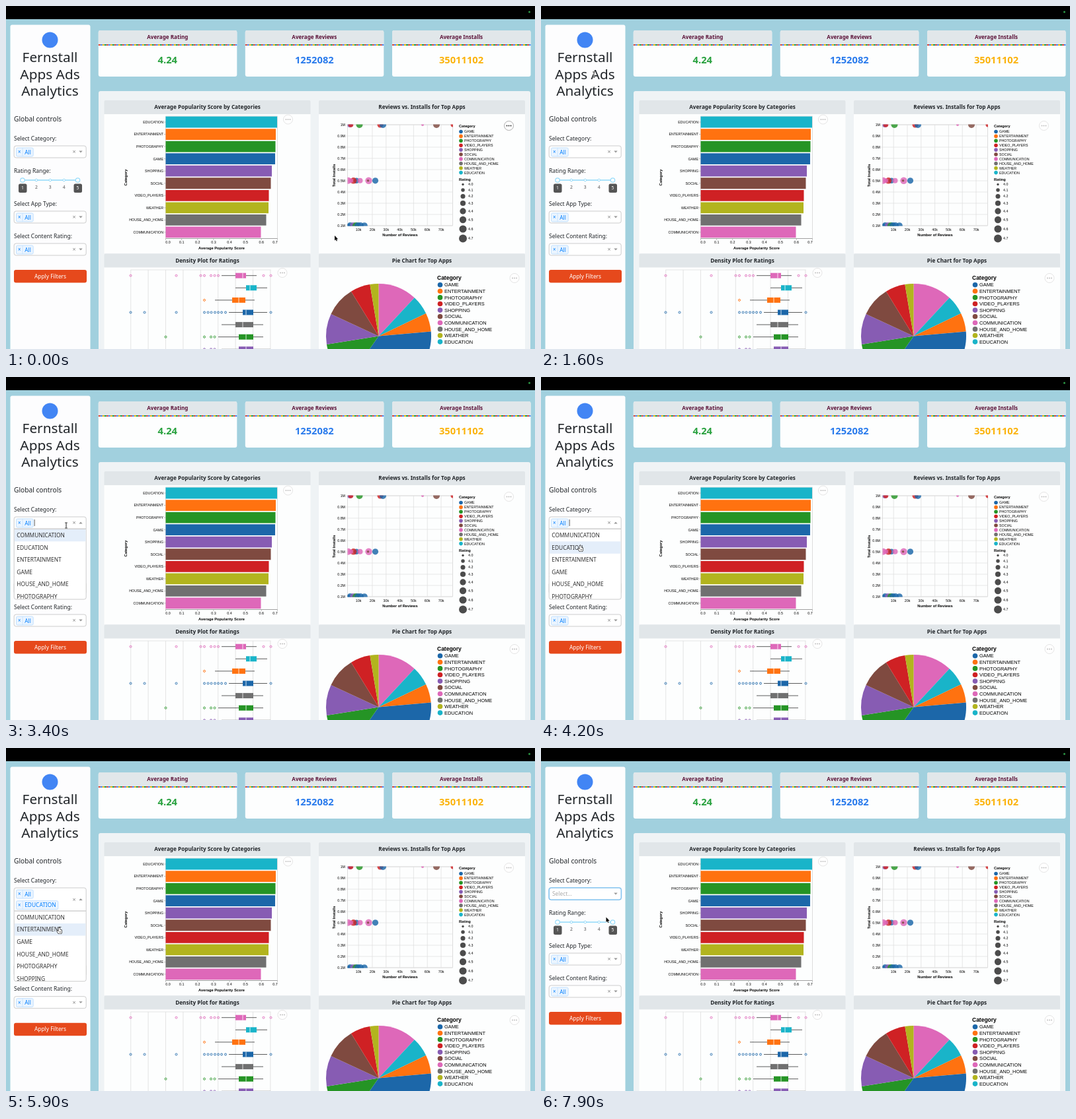
Write an HTML page with a canvas that moves like this. It is 800 by 520 pixels and loops after 8 s.

```html
<!DOCTYPE html>
<html lang="en">
<head>
<meta charset="utf-8">
<title>Ads Analytics</title>
<style>
html, body { margin: 0; width: 800px; height: 520px; overflow: hidden; background: #a1d0de; }
canvas { display: block; }
</style>
</head>
<body>
<canvas id="stage" width="800" height="520"></canvas>
<script>
const c = document.getElementById('stage').getContext('2d');
const LOOP = 8000, TAU = Math.PI * 2;
const UI = '"Noto Sans", "Open Sans", sans-serif';
const CHART = '"Liberation Sans", Arial, sans-serif';
const MENU = 'Inter, sans-serif';
const COLORS = {
  GAME: '#1c67a9', ENTERTAINMENT: '#ff7210', PHOTOGRAPHY: '#259425', VIDEO_PLAYERS: '#cf2124',
  SHOPPING: '#875cb3', SOCIAL: '#7f4a40', COMMUNICATION: '#de68b9', HOUSE_AND_HOME: '#707070',
  WEATHER: '#b2b41e', EDUCATION: '#19b4c9'
};
const NAMES = Object.keys(COLORS);
const [BLUE, ORANGE, GREEN, RED, PURPLE, BROWN, PINK, GREY, OLIVE, CYAN] = Object.values(COLORS);

// ---- drawing helpers ----
function rect(x, y, w, h, fill, r = 0, stroke) {
  c.beginPath();
  c.roundRect(x, y, w, h, r);
  if (fill) { c.fillStyle = fill; c.fill(); }
  if (stroke) { c.strokeStyle = stroke; c.lineWidth = 1; c.stroke(); }
}
function dot(x, y, r, fill, stroke, width = 1) {
  c.beginPath();
  c.arc(x, y, r, 0, TAU);
  if (fill) { c.fillStyle = fill; c.fill(); }
  if (stroke) { c.strokeStyle = stroke; c.lineWidth = width; c.stroke(); }
}
function line(x1, y1, x2, y2, color, width = 1) {
  c.strokeStyle = color;
  c.lineWidth = width;
  c.beginPath();
  c.moveTo(x1, y1);
  c.lineTo(x2, y2);
  c.stroke();
}
function poly(points, fill, stroke) {
  c.beginPath();
  points.forEach(p => c.lineTo(...p));
  c.closePath();
  if (stroke) { c.strokeStyle = stroke; c.lineWidth = 1.2; c.stroke(); }
  c.fillStyle = fill;
  c.fill();
}
// y is the middle of the capitals
function text(s, x, y, size, color = '#212529', align = 'left', font = UI, weight = 400) {
  c.font = `${weight} ${size}px ${font}`;
  c.textAlign = align;
  c.fillStyle = color;
  c.fillText(s, x, y + size * .36);
}
const label = (s, x, y, size = 5.3, align = 'left', weight = 400) =>
  text(s, x, y, size, '#000', align, CHART, weight);
function sideLabel(s, x, y) {
  c.save();
  c.translate(x, y);
  c.rotate(-Math.PI / 2);
  label(s, 0, 0, 5.75, 'center', 700);
  c.restore();
}
function actions(x, y, hot) {
  dot(x, y, 7, '#fff', hot ? '#999' : '#ddd', .8);
  for (const d of [-3, 0, 3]) dot(x + d, y, .9, hot ? '#222' : '#bbb');
}

// ---- dashboard ----
function card(x, title, value, color) {
  rect(x, 37, 209.5, 70, '#fdfefe', 3);
  rect(x, 37, 209.5, 21.5, '#e1e7ea', [3, 3, 0, 0]);
  const stripe = ['#db4437', '#4285f4', '#f4b400', '#0f9d58'];
  for (let i = 0; i < 70; i++) rect(x + i * 3, 58, Math.min(3, 209.5 - i * 3), 2, stripe[i % 4]);
  text(title, x + 104.5, 47.5, 8.1, '#5c1238', 'center', UI, 700);
  text(value, x + 104.5, 82, 14.7, color, 'center', UI, 700);
}
function panel(x, y, title) {
  rect(x, y, 312, 21, '#e1e6e9', [2, 2, 0, 0]);
  rect(x, y + 21, 312, 211, '#fdfefe');
  text(title, x + 156, y + 10.5, 8.2, '#212529', 'center', UI, 700);
}

function barChart() {
  const ends = [410, 408, 407.5, 407, 402, 400.5, 397.5, 397, 393.5, 385.5];
  const order = ['EDUCATION', 'ENTERTAINMENT', 'PHOTOGRAPHY', 'GAME', 'SHOPPING', 'SOCIAL',
    'VIDEO_PLAYERS', 'WEATHER', 'HOUSE_AND_HOME', 'COMMUNICATION'];
  rect(241.5, 167, 169, 185.5, null, 0, '#ddd');
  order.forEach((name, i) => {
    const y = 176 + i * 18.55;
    rect(241.5, y - 8.4, ends[i] - 241.5, 16.8, COLORS[name]);
    line(238.8, y, 241.5, y, '#999', .6);
    label(name, 238, y, 5.3, 'right');
  });
  for (let i = 0; i < 8; i++) {
    const x = 241.5 + i * 24.13;
    line(x, 352.5, x, 355, '#999', .6);
    label((i / 10).toFixed(1), i == 0 ? 245 : i == 7 ? 407 : x, 358.5, 5.4, 'center');
  }
  line(241.5, 352.5, 410.5, 352.5, '#888', .7);
  label('Average Popularity Score', 326, 366.5, 5.75, 'center', 700);
  sideLabel('Category', 181, 260);
}

function scatter() {
  rect(516.5, 180, 159, 153, null, 0, '#ddd');
  for (let i = 1; i < 8; i++) {
    const x = 512.4 + i * 20.8;
    line(x, 180, x, 333, '#ddd', .7);
    label(i + '0k', x, 339, 5.4, 'center');
  }
  for (let i = 1; i <= 10; i++) {
    const y = 350 - i * 17;
    line(514, y, 675.5, y, '#ddd', .7);
    label(i == 10 ? '1M' : '0.' + i + 'M', 513, y, 5.3, 'right');
  }
  c.save();
  c.beginPath();
  c.rect(516.5, 179.5, 159.5, 154);
  c.clip();
  c.globalAlpha = .82;
  const rows = [
    [180, [[520, 4, PURPLE], [521.5, 3.8, RED], [534.5, 5, GREEN], [566, 4.5, RED], [570, 5, BLUE],
      [630, 2, PINK], [651, 5, BROWN], [676, 3.5, RED]]],
    [264.8, [[530, 4.3, BLUE], [525.5, 4.8, RED], [521.5, 3.5, PINK], [517.5, 5, PINK],
      [535.5, 4, PINK], [548.5, 5.2, PINK], [547.5, 1.8, BROWN], [558.5, 4.6, BLUE]]],
    [333, [[518.5, 3, BLUE], [520.5, 5, BLUE], [525, 5, PURPLE], [529, 5, GREEN], [532, 5, BLUE],
      [536, 5, BLUE], [542, 4.8, BLUE]]]
  ];
  for (const [y, dots] of rows) for (const [x, r, color] of dots) dot(x, y, r, color);
  c.restore();
  label('Number of Reviews', 596, 347, 5.75, 'center', 700);
  sideLabel('Total Installs', 496, 257);

  label('Category', 685, 182, 5.7, 'left', 700);
  NAMES.forEach((name, i) => {
    const y = 190.5 + i * 6.9;
    dot(688, y, 2.8, COLORS[name]);
    label(name, 693, y);
  });
  label('Rating', 685, 262.5, 5.7, 'left', 700);
  [270.5, 279, 288.5, 299, 311, 324, 338, 352.5].forEach((y, i) => {
    dot(691, y, 1.9 * Math.sqrt(i * 1.3 + .8), '#4c4c4c');
    label('4.' + i, 699, y);
  });
}

// color, whisker ends, box ends, median, outliers
const BOXES = [
  [PINK, 326, 379, 347, 363, 358, [188.5, 257.5, 294.5, 300, 310, 315.5, 321, 389.5, 400.5]],
  [CYAN, 347, 395, 363, 379, 369, []],
  [ORANGE, 316, 376, 342, 362, 352, [300]],
  [BLUE, 337, 395, 358, 374, 363, [188.5, 209.5, 257.5, 300, 305.5, 310.5, 316, 321, 326, 332, 400.5]],
  [GREY, 326, 389, 347, 374, 358, []],
  [GREEN, 321, 389, 352, 374, 363, [241.5, 300, 310, 315.5]],
  [PURPLE, 326, 400, 352, 374, 363, [300, 310, 315.5]]
];
function boxPlot() {
  for (let i = 0; i < 9; i++) line(188.7 + i * 26.4, 400, 188.7 + i * 26.4, 520, '#ddd', .8);
  line(188.5, 400, 400.5, 400, '#ddd', .8);
  BOXES.forEach(([color, lo, hi, q1, q3, mid, outliers], i) => {
    const y = 408.7 + i * 18.6;
    line(lo, y, hi, y, '#333', .8);
    rect(q1, y - 4, q3 - q1, 8, color);
    line(mid, y - 4, mid, y + 4, '#fff', .8);
    outliers.forEach(x => dot(x, y, 1.5, null, color, .9));
  });
}

function pie() {
  const stops = [0, 43, 64.3, 85, 215, 261, 295, 328.5, 350.5, 360];
  [PINK, CYAN, ORANGE, BLUE, GREEN, PURPLE, BROWN, RED, OLIVE].forEach((color, i) => {
    const at = d => (d - 90) * TAU / 360;
    c.beginPath();
    c.moveTo(563.5, 500.5);
    c.arc(563.5, 500.5, 79.5, at(stops[i]), at(stops[i + 1]));
    c.fillStyle = color;
    c.fill();
  });
  label('Category', 652, 412, 8.5, 'left', 700);
  NAMES.forEach((name, i) => {
    const y = 422.7 + i * 9.6;
    dot(656.5, y, 3.8, COLORS[name]);
    label(name, 663, y, 7.4);
  });
}

// ---- sidebar ----
function tag(name, y) {
  c.font = `8.4px ${UI}`;
  const w = c.measureText(name).width + 16;
  rect(15.5, y - 6.5, w, 13, '#ebf5ff', 2, '#c2e0ff');
  line(25, y - 6.5, 25, y + 6.5, '#c2e0ff', .8);
  text('×', 20.2, y, 8, '#007eff', 'center');
  text(name, 28.2, y, 8.4, '#007eff');
  return 15.5 + w;
}
function select(y, tags, { open, focus, caret } = {}) {
  const h = tags.length > 1 ? 35 : 18, mid = y + h / 2;
  if (focus) rect(11.5, y - .5, 110.5, h + 1, null, 3, '#cbe6f8');
  rect(12.2, y, 109, h, '#fff', open ? [3, 3, 0, 0] : 3, focus ? '#5aaeea' : '#ccc');
  let end = 15;
  tags.forEach((name, i) => end = tag(name, y + 9.5 + i * 16.7));
  if (!tags.length) text('Select...', 17, mid, 8.4, '#aaa');
  if (caret) line(end + 2, y + h - 14, end + 2, y + h - 4, '#333', .8);
  if (tags.length) text('×', 103, mid, 9, '#888', 'center');
  const d = open ? -1.4 : 1.4;
  poly([[110.3, mid - d], [115.7, mid - d], [113, mid + d]], '#999');
}
function menu(y, options, active) {
  rect(12.2, y, 109, 106.5, '#fff', [0, 0, 3, 3], '#ccc');
  c.save();
  c.beginPath();
  c.rect(12.7, y + .3, 108, 105.5);
  c.clip();
  options.forEach((name, i) => {
    const top = y + .3 + i * 18.55;
    if (i == active) rect(12.7, top, 108, 18.5, '#e4eefa');
    text(name, 16.3, top + 9.4, 8.4, '#333');
  });
  c.restore();
}
function slider(y) {
  line(25, y, 108.5, y, '#abe2fb', 2);
  for (let i = 1; i < 4; i++) {
    dot(25 + i * 20.9, y, 1.8, '#fff', '#96dbfa');
    text(i + 1, 25 + i * 20.9, y + 10.5, 6.8, '#555', 'center');
  }
  [[25, '1'], [108.5, '5']].forEach(([x, s]) => {
    dot(x, y, 3.2, '#fff', '#96dbfa', 1.2);
    rect(x - 6, y + 5.5, 12.5, 13.5, '#555', 2.5);
    text(s, x, y + 12, 6.8, '#fff', 'center');
  });
}
function sidebar(t, pointer) {
  const open = (t >= 2900 && t < 4300) || (t >= 5400 && t < 6900);
  const two = t >= 4300 && t < 6900;
  const shift = two ? 16.7 : 0;
  rect(6.5, 28.5, 121, 495, '#fdfdfe', 3);
  dot(66.5, 51.5, 12, '#4285f4');
  ['Fernstall', 'Apps Ads', 'Analytics'].forEach((s, i) =>
    text(s, 66.5, 77.7 + i * 25.5, 20.8, '#212529', 'center'));
  text('Global controls', 12, 171, 10.2);
  text('Select Category:', 12, 201, 8.5);
  select(212, t >= 6900 ? [] : two ? ['All', 'EDUCATION'] : ['All'],
    { open, focus: t >= 2900 && !open, caret: open && Math.floor(t / 500) % 2 == 0 });

  c.save();
  c.translate(0, shift);
  text('Rating Range:', 12, 249.7, 8.5);
  slider(264);
  text('Select App Type:', 12, 300, 8.5);
  select(311, ['All']);
  text('Select Content Rating:', 12, 348.7, 8.5);
  select(360, ['All']);
  rect(12, 400, 110, 19.5, '#e6491c', 3);
  text('Apply Filters', 67, 409.7, 8.4, '#fff', 'center');
  c.restore();

  if (open) {
    const all = [...NAMES].sort(), top = 230.5 + shift;
    const row = Math.floor((pointer[1] - top) / 18.55);
    menu(top, two ? all.filter(n => n != 'EDUCATION') : all, Math.max(0, row));
  }
  return open ? 230 + shift : Infinity;
}

// ---- browser bars that slide in at the top ----
function browserBars(k) {
  if (k <= 0) return;
  c.save();
  c.translate(0, (k - 1) * 46);
  rect(0, 15, 800, 13, '#1c1d20');
  ['#e8483f', '#d99f28', '#35a848'].forEach((color, i) => dot(31 + i * 9.5, 22, 2.8, color));
  const tints = ['#2d70b8', '#2d70b8', '#2d70b8', '#777', '#c92c2c', '#e8e8e8', '#bbb', '#bbb'];
  for (let i = 0; i < 25; i++) {
    const x = 75 + i * 25.9;
    if (i % 5 == 0) rect(x - 3, 19, 6, 6, tints[i % 8], 1);
    else dot(x, 22, 3, tints[(i * 3) % 8]);
    line(x + 13, 19, x + 13, 25, '#4a4b4e', .7);
  }
  text('×', 727, 22, 8, '#bbb', 'center');
  text('+', 746, 22, 9, '#bbb', 'center');
  rect(0, 27, 800, 18.5, '#303134');
  rect(62, 28.5, 618, 14, '#27282b', 7);
  text('←', 12, 35, 9, '#ccc', 'center');
  text('→', 27, 35, 9, '#777', 'center');
  c.beginPath();
  c.arc(45, 35.5, 3, .5, 5.6);
  c.strokeStyle = '#ccc';
  c.lineWidth = 1;
  c.stroke();
  dot(72, 35.5, 2.5, null, '#aaa');
  text('127.0.0.1:8050', 83, 35.5, 7.2, '#ddd', 'left', MENU);
  text('☆', 665, 35.5, 9, '#bbb', 'center', '"DejaVu Sans", sans-serif');
  rect(695, 32.5, 5.5, 5.5, null, 1, '#bbb');
  dot(720, 35.5, 4.5, '#8a8f9c');
  rect(732, 28.5, 64, 14, '#0c3468', 7);
  text('Finish update', 738, 35.5, 6.9, '#a8c7fa', 'left', MENU, 500);
  text('⋮', 788, 35.5, 8, '#a8c7fa', 'center');

  rect(0, 0, 800, 20, '#121314');
  dot(14, 9.5, 3, '#999');
  text('Tarnel', 29, 9.8, 6.8, '#aaa', 'left', MENU, 700);
  [['File', 66], ['Edit', 88], ['View', 112], ['History', 138], ['Bookmarks', 172], ['Profiles', 219],
    ['Tab', 253.5], ['Window', 276], ['Help', 312]].forEach(([s, x]) => text(s, x, 9.8, 6.7, '#999', 'left', MENU));
  dot(571.5, 9.8, 3, null, '#999');
  rect(568.8, 7.5, 5, 4.5, '#999', 1);
  rect(584.5, 4, 18.5, 11.5, '#c09b20', 3);
  rect(589.5, 7.2, 6, 5, '#eee', 1);
  dot(615, 9.8, 3, '#999');
  dot(632, 9.8, 2.8, null, '#999');
  rect(646.5, 7.5, 9, 4.5, null, 1.2, '#888');
  c.beginPath();
  c.moveTo(674, 12.5);
  c.arc(674, 12.5, 5.5, -2.3, -.85);
  c.fillStyle = '#999';
  c.fill();
  dot(690, 9, 2.4, null, '#999');
  rect(703, 6.7, 10, 2.5, null, 1, '#999');
  rect(703, 10.7, 10, 2.5, null, 1, '#999');
  text('Mon Mar 17  1:53 AM', 791, 9.8, 6.8, '#aaa', 'right', MENU);
  c.restore();
}

// ---- pointer ----
const PATH = [[0, 497, 348], [200, 497, 348], [800, 59, 14], [1100, 59, 14], [1600, 80, 104], [2700, 91, 225],
  [3500, 91, 225], [4100, 60, 259], [4400, 60, 259], [4900, 57, 261], [5300, 86, 236], [5450, 86, 236],
  [5850, 81, 276], [6100, 81, 276], [6700, 103, 231], [7200, 103, 231], [7900, 98.5, 256.5], [LOOP, 98.5, 256.5]];
function pointerAt(t) {
  const i = PATH.findIndex(p => p[0] > t), [t0, x0, y0] = PATH[i - 1], [t1, x1, y1] = PATH[i];
  let k = (t - t0) / (t1 - t0);
  k = k * k * (3 - 2 * k);
  return [x0 + (x1 - x0) * k, y0 + (y1 - y0) * k];
}
function drawPointer([x, y], menuTop) {
  const overTitle = x > 20 && x < 113 && y > 68 && y < 138;
  const overInput = x > 12 && x < 98 && y > 212 && y < Math.min(menuTop, 230);
  c.save();
  c.translate(x, y);
  if (x < 121 && y > menuTop) {
    poly([[-1.5, -3], [-.5, -4], [.5, -3], [.7, -.8], [3.3, .2], [3.5, 3], [2.5, 5.5], [-1.5, 5.5],
      [-4, 1.8], [-3.4, 1], [-1.5, 2]], '#fff', '#000');
    for (const d of [0, 1.5]) line(d, 1.8, d, 4, '#000', .5);
  } else if (overTitle || overInput) {
    const beam = (color, w) => {
      line(0, -3.5, 0, 3.5, color, w);
      for (const d of [-4, 4]) line(-1.8, d, 1.8, d, color, w);
    };
    beam('#fff', 2);
    beam('#222', 1);
  } else {
    poly([[0, 0], [0, 7.5], [1.7, 6], [2.8, 8.6], [4, 8], [2.9, 5.6], [5.2, 5.4]], '#000', '#fff');
  }
  c.restore();
}

function draw(t) {
  const pointer = pointerAt(t);
  rect(0, 0, 800, 520, '#a1d0de');
  rect(0, 0, 800, 20, '#000');
  dot(791.5, 9, 1.5, '#2c9a45');
  card(139.8, 'Average Rating', '4.24', '#28a13e');
  card(361.8, 'Average Reviews', '1252082', '#2a7bec');
  card(584, 'Average Installs', '35011102', '#fbb30c');
  rect(140, 129, 653, 400, '#eff3f5', 3);
  panel(148.5, 143, 'Average Popularity Score by Categories');
  panel(473, 143, 'Reviews vs. Installs for Top Apps');
  panel(148.5, 375.5, 'Density Plot for Ratings');
  panel(473, 375.5, 'Pie Chart for Top Apps');
  barChart();
  scatter();
  boxPlot();
  pie();
  const hot = (x, w) => pointer[0] > x && pointer[0] < x + w && pointer[1] > 164 && pointer[1] < 375;
  actions(426.5, 172, hot(170, 265));
  actions(760.5, 181.5, hot(485, 285));
  actions(418, 404.5);
  actions(769, 412.5);
  const menuTop = sidebar(t, pointer);
  browserBars(Math.min(1, (t - 700) / 200, (1400 - t) / 200));
  drawPointer(pointer, menuTop);
}

function tick(now) {
  draw(now % LOOP);
  requestAnimationFrame(tick);
}
draw(0);
requestAnimationFrame(tick);
</script>
</body>
</html>
```
